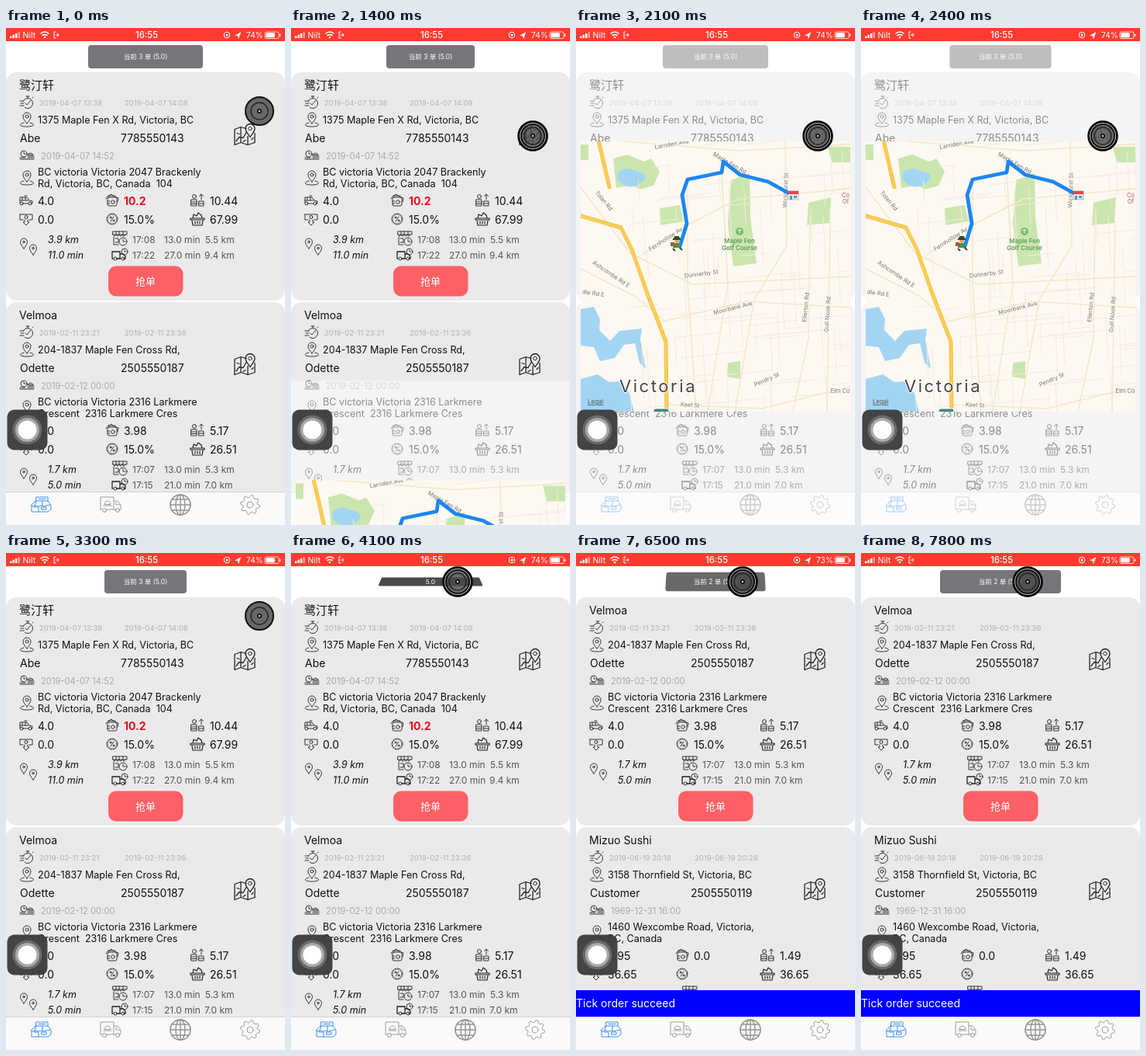
Animation, 360 px wide and 640 px high, one loop 8000 ms. Source, as an HTML page:

```html
<!DOCTYPE html>
<html lang="en">
<head>
<meta charset="utf-8">
<title>Courier orders</title>
<style>
html, body { margin: 0; width: 100%; height: 100%; overflow: hidden; background: #fff; }
svg { display: block; width: 360px; height: 640px; }
text { font-family: Inter, "Noto Sans CJK SC", "Noto Sans CJK", sans-serif; white-space: pre; }
defs g { fill: none; stroke: currentColor; stroke-width: .9; stroke-linecap: round; stroke-linejoin: round; }
.road { font-size: 7.5px; fill: #77736d; text-anchor: middle; stroke: #fdf8f1; stroke-width: 2px; paint-order: stroke; }
</style>
</head>
<body>
<svg id="stage" viewBox="0 0 360 640">
  <defs>
    <g id="watch"><circle cx="1" cy="1" r="6.5" stroke-dasharray="32 9" stroke-dashoffset="-23"/><path d="M-2 1l2 2 5-6M-1-8h4M1-8v2M7-6l1-1M-9-2h5M-8 1h4M-9 4h5"/></g>
    <g id="pin"><path d="M0 5C-3 1-5-1-5-4a5 5 0 0 1 10 0C5-1 3 1 0 5zM-4 4c-8 2-5 5 4 5s12-3 4-5"/><circle cy="-4" r="2"/></g>
    <g id="drop"><path d="M0 6C-3 2-4.5 0-4.5-2.500a4.500 4.500 0 0 1 9 0C4.500 0 3 2 0 6z"/><circle cy="-2.500" r="1.300"/></g>
    <g id="map"><path stroke-width="1.300" d="M2-7l-7-2-8 3v20l8-3 9 3 9-3V-1M-5-9v20M4 3v11M-11 9l4-5 5 1 4-7M-10-1l3 1M-2 10l3-2M9 7l2-2"/><path stroke-width="1.300" d="M7 4C4-1 1-3 1-7a6 6 0 0 1 12 0c0 4-3 6-6 11z"/><circle cx="7" cy="-7" r="2.300"/></g>
    <g id="meal"><circle cx="-4" cy="-2" r="4"/><path d="M-4-4v2h2M-9 5h18M-9 3h7M1-1q4-4 7 0zM1 1h8M1 3h8"/></g>
    <g id="car"><path d="M-8 3v-7h9l3 4 4 1v3h-1M-4 4h7M-5-4v4h8M-1-4v4M-8 0h3M-2-6h3"/><circle cx="-6" cy="4" r="2"/><circle cx="5" cy="4" r="2"/></g>
    <g id="hand"><rect x="-6" y="-4" width="12" height="11" rx="2"/><path d="M-8-2l2-3 5-3 3 3M3-5l5 2-1 5M-6 1h3M-6 4h3M-5-6h9"/><circle cx="1" cy="2" r="2.300"/></g>
    <g id="gain"><path d="M-8-1h7v8h-7zM-8 2h7M-8 4.500h7M2 1h6v6H2zM2 4h6M5-1v-7l-2.500 2.500m2.500-2.500l2.500 2.500"/><circle cx="-4" cy="-5" r="2.500"/></g>
    <g id="note"><path d="M-8-6H8v7H4M-4 1h-4v-7M-2 1v3h-2l4 4 4-4H2V1"/><circle cy="-2.500" r="2"/></g>
    <g id="rate"><circle r="7" stroke-dasharray="2.500 1.200"/><circle r="6" stroke-width=".5"/><path d="M-2 3l4-6"/><circle cx="-2" cy="-2" r="1"/><circle cx="2" cy="2" r="1"/></g>
    <g id="basket"><path stroke-width="1.200" d="M-9-1H9v2H-9zM-7 2l1 6H6l1-6M-3 3v3M0 3v3M3 3v3M-6-1l1-5 4 2 2-4 4 3 1 4"/></g>
    <g id="shop"><path d="M-9-9H9v4H-9zM-9-5q2 4 4 0q2 4 4 0q2 4 4 0q2 4 4 0M-8-2V8h6M-6 0h4v5h-4M-5-9v4M-1-9v4M4-9v4"/><circle cx="4" cy="4" r="5"/><path d="M4 1v3h3"/></g>
    <g id="truck"><path stroke-width="1.300" d="M-10 5v-9H0V5h-4M-9 5h-1M0-1h4l3 3v3H5M0 5h1"/><circle cx="-6" cy="5" r="2"/><circle cx="4" cy="5" r="2"/><circle cx="6" cy="-4" r="4"/><path d="M6-6v2h2"/></g>
    <g id="store"><path d="M-6-9H9v5H-6zM-3-6.500H6M-7-4l-6 6q3 2 6 0q4 2 7 0q4 2 7 0l6-1L9-4M-12 3v7H9l4-3V2M-9 4h6v6M1 4h6v3H1zM-6-4l-2 6M2-4v6"/></g>
    <g id="van"><path d="M-13 7v-16H4V7H-5M-11 7h-2M4-4h5l4 5v6h-2M7 7H4M7-2v3h5M-8 0a4 4 0 0 1 8 0zM-9 2H1"/><circle cx="-8" cy="8" r="2.500"/><circle cx="9" cy="8" r="2.500"/></g>
    <g id="globe"><path stroke-width="1.400" d="M0-13v26M-13 0h26M-11-7h22M-11 7h22"/><circle r="13" stroke-width="1.600"/><ellipse rx="6" ry="13" stroke-width="1.400"/></g>
    <g id="gear"><circle r="4"/><path id="cog"/></g>
    <clipPath id="frame"><rect x="6" y="146" width="348" height="348"/></clipPath>
  </defs>
  <rect width="360" height="640" fill="#fff"/>
  <g id="before"></g>
  <g id="after"></g>
  <g id="pill"><polygon stroke-linejoin="round"/><text text-anchor="middle" fill="#fff" font-size="8.500" y="3"></text></g>
  <g id="toast"><polygon/><text x="0" y="5" font-size="14" fill="#fff">Tick order succeed</text></g>
  <g id="tabs"></g>
  <g id="modal"></g>
  <g id="status"></g>
  <g>
    <rect x="1.500" y="491.500" width="52" height="52" rx="9" fill="#3c3c3f" fill-opacity=".95"/>
    <circle cx="27.500" cy="517.500" r="19" fill="#6a6a6c"/><circle cx="27.500" cy="517.500" r="15.500" fill="#a9a9aa"/><circle cx="27.500" cy="517.500" r="12" fill="#fff"/>
  </g>
  <g id="puck">
    <circle r="18" fill="#48484a" fill-opacity=".8" stroke="#111" stroke-width="2"/>
    <g id="halo" fill="none"><circle r="18.500" stroke="#000" stroke-width="2.500"/><circle r="16.500" stroke="#bbb" stroke-width="1"/><circle r="15" stroke="#000" stroke-width="1.500"/></g>
    <circle r="11" fill="none" stroke="#252527" stroke-width="1.500"/>
    <circle r="3" fill="#111"/><circle r="1.200" fill="#ddd"/>
  </g>
</svg>
<script>
const $ = id => document.getElementById(id);
const text = (x, y, s, size = 14, fill = '#111', more = '') =>
  `<text x="${x}" y="${y}" font-size="${size}" fill="${fill}" ${more}>${s}</text>`;
const icon = (id, x, y, color = '#222') => `<use href="#${id}" x="${x}" y="${y}" color="${color}"/>`;
const path = (d, stroke, width, fill = 'none') =>
  `<path d="${d}" fill="${fill}" stroke="${stroke}" stroke-width="${width}" stroke-linejoin="round" stroke-linecap="round"/>`;

// Order cards
function card(o, y) {
  const small = (x, y, s) => text(x, y, s, 12, '#555');
  const italic = 'font-style="italic"';
  return `<g transform="translate(0 ${y})">
    <rect y="57" width="360" height="294" rx="14" fill="#ebe9eb"/>` +
    text(17, 78.500, o.shop, o.shop.length < 4 ? 15 : 14) +
    icon('watch', 27, 96) + text(43, 99.500, o.from, 9.6, '#b3b1b4') + text(153, 99.500, o.to, 9.6, '#b3b1b4') +
    icon('pin', 27, 118) + text(41, 123, o.pick, 12.6) + icon('map', 308, 136.500) +
    text(18, 147, o.name) + text(148, 147, o.phone) +
    icon('meal', 27, 164) + text(45, 168.500, o.due, 11.2, '#aaa8ab') +
    icon('pin', 27, 193) + text(41, 190, o.drop[0], 12.6) + text(41, 205, o.drop[1], 12.6) +
    ['car', 'hand', 'gain', 'note', 'rate', 'basket'].map((id, i) => {
      const x = [26, 137, 247][i % 3], row = i < 3 ? 222 : 246, hot = o.hot && i == 1;
      return icon(id, x, row) + text([41, 152, 263][i % 3], row + 5.500, o.vals[i], 14,
        hot ? '#f00a16' : '#111', hot ? 'font-weight="700"' : '');
    }).join('') +
    icon('drop', 23, 278) + icon('drop', 35, 286) +
    text(54, 277, o.trip[0], 12.5, '#111', italic) + text(54, 297, o.trip[1], 12.5, '#111', italic) +
    icon('shop', 147, 271) + icon('truck', 147, 292) +
    o.legs.map((leg, i) => leg.map((s, k) => small([163, 204, 257][k] - (k == 2 && i ? 1 : 0), 276.500 + 20 * i, s)).join('')).join('') +
    `<rect x="132" y="306.500" width="96.500" height="39" rx="10" fill="#fd6065"/>` +
    text(180, 330.500, '抢单', 13, '#fff', 'text-anchor="middle"') + '</g>';
}
const orders = [
  { shop: '鹭汀轩', from: '2019-04-07 13:38', to: '2019-04-07 14:08', pick: '1375 Maple Fen X Rd, Victoria, BC',
    name: 'Abe', phone: '7785550143', due: '2019-04-07 14:52', hot: true,
    drop: ['BC victoria Victoria 2047 Brackenly', 'Rd, Victoria, BC, Canada  104'],
    vals: ['4.0', '10.2', '10.44', '0.0', '15.0%', '67.99'], trip: ['3.9 km', '11.0 min'],
    legs: [['17:08', '13.0 min', '5.5 km'], ['17:22', '27.0 min', '9.4 km']] },
  { shop: 'Velmoa', from: '2019-02-11 23:21', to: '2019-02-11 23:36', pick: '204-1837 Maple Fen Cross Rd,',
    name: 'Odette', phone: '2505550187', due: '2019-02-12 00:00',
    drop: ['BC victoria Victoria 2316 Larkmere', 'Crescent  2316 Larkmere Cres'],
    vals: ['4.0', '3.98', '5.17', '0.0', '15.0%', '26.51'], trip: ['1.7 km', '5.0 min'],
    legs: [['17:07', '13.0 min', '5.3 km'], ['17:15', '21.0 min', '7.0 km']] },
  { shop: 'Mizuo Sushi', from: '2019-06-19 20:18', to: '2019-06-19 20:28', pick: '3158 Thornfield St, Victoria, BC',
    name: 'Customer', phone: '2505550119', due: '1969-12-31 16:00',
    drop: ['1460 Wexcombe Road, Victoria,', 'BC, Canada'],
    vals: ['3.95', '0.0', '1.49', '36.65', '', '36.65'], trip: ['', ''], legs: [] }
];
$('before').innerHTML = card(orders[0], 0) + card(orders[1], 296);
$('after').innerHTML = card(orders[1], 0) + card(orders[2], 296);

// Tab bar
let cog = '';
for (let i = 0; i < 32; i++) {
  const a = (i + .5) * Math.PI / 16, r = i % 4 < 2 ? 12.5 : 9.5;
  cog += `${i ? 'L' : 'M'}${r * Math.cos(a)} ${r * Math.sin(a)}`;
}
$('cog').setAttribute('d', cog + 'z');
$('tabs').innerHTML = '<rect y="597.500" width="360" height="43" fill="#faf9fb"/>' + path('M0 597.500H360', '#c4c4c6', .7) +
  icon('store', 45, 613, '#2388f2') + icon('van', 135, 613, '#929294') +
  icon('globe', 225, 614, '#929294') + icon('gear', 315, 614, '#929294');

// Status bar
$('status').innerHTML = '<rect width="360" height="17" fill="#ff3b30"/>' +
  [0, 1, 2, 3].map(i => `<rect x="${5 + 3.5 * i}" y="${10.5 - 1.8 * i}" width="2.500" height="${2.5 + 1.8 * i}" fill="#fff" opacity="${i < 3 ? 1 : .5}"/>`).join('') +
  text(21.500, 12.800, 'Nilt', 10.5, '#fff') +
  path('M45 7q5-4 10 0M47 9.500q3-2 6 0', '#fff', 1.6) + '<circle cx="50" cy="12" r="1.300" fill="#fff"/>' +
  path('M64 5h-2v8h2M64 9h4l-1.500-2m1.500 2l-1.500 2', '#fff', 1) +
  text(181.500, 13, '16:55', 11.4, '#fff', 'text-anchor="middle" font-weight="500"') +
  '<circle cx="285" cy="9" r="3.800" fill="none" stroke="#fff"/><circle cx="285" cy="9" r="1.500" fill="#fff"/>' +
  path('M296 9.500l7-4-3 8-.8-3.500z', '#fff', .5, '#fff') +
  text(310, 12.800, '74%', 10.2, '#fff', 'id="charge"') +
  '<rect x="334" y="5" width="18" height="8.500" rx="2" fill="none" stroke="#fff" stroke-width=".8"/><rect x="335.300" y="6.300" width="11.500" height="6" rx="1" fill="#fff"/><rect x="353" y="7.500" width="1.200" height="3.500" fill="#fff"/>';

// Map sheet
function streets() {
  let seed = 7, thin = '', wide = '';
  const rnd = () => (seed = seed * 16807 % 2147483647) / 2147483647;
  for (let i = 0; i < 110; i++) {
    const x = 70 + rnd() * 285, y = 150 + rnd() * 340, len = 20 + rnd() * 65;
    thin += i % 2 ? `M${x} ${y}l${len} ${-len * .1}` : `M${x} ${y}l${len * .05} ${len}`;
  }
  for (const d of ['M6 205L70 290 150 330 354 320', 'M85 292L135 258 210 220 354 207', 'M112 378L220 352 354 360',
    'M60 146L210 158 354 150', 'M270 146L272 280 230 350 205 494', 'M302 240L300 400 280 494', 'M328 250L324 494',
    'M118 485L240 490 354 462', 'M6 310L75 345 112 375', 'M188 186L196 330 170 494', 'M144 195L144 330 155 494']) wide += d;
  return path(thin, '#f4ebdf', 1) + path(wide, '#f5e6c8', 1.5);
}
const road = (x, y, angle, s) => `<text class="road" transform="translate(${x} ${y}) rotate(${angle})">${s}</text>`;
const park = d => path(d, 'none', 0, '#cae6ae'), water = d => path(d, 'none', 0, '#a3d5f3');
const highway = 'M28 140L43 205M6 242L58 257 72 285 92 342 116 404 117 494';
$('modal').innerHTML = '<rect y="18" width="360" height="640" fill="#fff" fill-opacity=".52"/><g clip-path="url(#frame)">' +
  '<rect x="6" y="146" width="348" height="348" fill="#fdf8f1"/>' +
  park('M48 168L66 163 88 172 97 168 108 185 100 203 82 208 73 202 52 206z M108 232l26-4 5 21-30 5z M200 196l24-9 1 58 8 58-30 4-7-55z M300 225l29-7-2 33-29 3z M196 431l16-2v23l-17-3z M325 153h29v20h-24z M6 150h10v20H6z') +
  water('M53 188q7-9 18-6l14 4q9 6 0 13-12 9-24 3l-7-6z M6 362l17-3 8 16-1 14 14 14 12-13 29-3-2 14 7 38-8-8-6-25-14 2-12 17-19 4-8-18-17-2z M6 452l22-6 15 10 16-1 10 16 6 23H6z') +
  streets() + path(highway, '#eabb48', 5) + path(highway, '#fccd52', 3.800) +
  road(124, 152, -10, 'Larriden Ave') + road(197, 176, 30, 'Maple Fen Rd') + road(34, 224, 50, 'Tolan Rd') +
  road(117, 274, -33, 'Fernhollow Av') + road(162, 319, -7, 'Dunnerby St') + road(203, 363, -14, 'Moorbank Ave') +
  road(273, 209, -88, 'Wickhurst St') + road(299, 360, -84, 'Ellerton Rd') + road(327, 369, -86, 'Gull Nook Rd') +
  road(247, 455, -24, 'Pendry St') + road(44, 319, 34, 'Ashcombe Rd E') + road(22, 344, 8, 'dle Rd E') +
  road(147, 488, 4, 'Keel St') + road(341, 470, 0, 'Elm Co') +
  text(348, 218, 'Co', 7.5, '#c15d5d', 'text-anchor="middle"') + text(348, 226, 'Of', 7.5, '#c15d5d', 'text-anchor="middle"') +
  '<circle cx="211" cy="262" r="5" fill="#7dba6c"/>' + path('M211 264v-4m-2 1l2-2 2 2', '#fff', 1) +
  text(211, 277, 'Maple Fen', 8, '#5a9a55', 'text-anchor="middle" font-weight="600"') +
  text(211, 286, 'Golf Course', 8, '#5a9a55', 'text-anchor="middle" font-weight="600"') +
  text(106, 469, 'Victoria', 22, '#444', 'text-anchor="middle" letter-spacing="2.600" stroke="#fff" stroke-width="2" paint-order="stroke"') +
  text(15, 484, 'Legal', 8, '#555', 'text-decoration="underline"') +
  '<rect x="100" y="490" width="20" height="9" rx="3" fill="#378a78" stroke="#fff"/>' +
  path('M134 281L143 252 137 215 144 195 188 186 190 172 212 189 248 198 275 213', '#1d86f0', 4.800) +
  '<rect x="274" y="210" width="13" height="11" fill="#eee" stroke="#777" stroke-width=".5"/><path d="M274 210h13v4h-13z" fill="#e34548"/><path d="M276 216h3v5h-3zM281 216h4v3h-4z" fill="#588ebd"/>' +
  '<circle cx="130" cy="274" r="3" fill="#e1ac66"/><path d="M126 272h8l-2-3h-4zM125 284l3 3M133 282l4 4" fill="#354a28" stroke="#354a28" stroke-width="2"/><path d="M125 277h9v6h-9z" fill="#558d48"/><path d="M122 276h5v5h-5z" fill="#a95836"/></g>';

// Motion
const clamp = v => Math.max(0, Math.min(1, v));
const span = (t, start, length = 500) => clamp((t - start) / length);
const smooth = p => p * p * (3 - 2 * p);
function track(t, keys) {
  let i = 1;
  while (i < keys.length - 1 && t > keys[i][0]) i++;
  const [a, ...from] = keys[i - 1], [b, ...to] = keys[i], p = smooth(span(t, a, b - a));
  return from.map((v, k) => v + (to[k] - v) * p);
}
const pillWidth = [[0, 148], [100, 148], [500, 112], [1300, 112], [1400, 114], [2100, 136], [3300, 106], [4100, 134],
  [4900, 104], [5600, 104], [6600, 130], [7100, 130], [7800, 156]];
const puckPath = [[0, 327, 107], [100, 327, 107], [500, 312, 139], [2900, 312, 139], [3250, 327, 81], [3350, 327, 81], [3800, 215, 37]];
const flips = [3790, 4500, 5250, 6100];
const gray = [119, 117, 121], red = [200, 0, 0];
const faces = [['当前 3 单 (5.0)', gray], ['5.0', gray], ['当前 3 单 (5.0)', gray], ['当前 3 单 (5.0)', red], ['当前 2 单 (5.0)', gray]];

function drawPill(t) {
  const w = track(t, pillWidth)[0] / 2;
  const tilt = flips.reduce((m, s) => Math.min(m, Math.abs(Math.cos(Math.PI * span(t, s)))), 1);
  const [label, rgb] = faces[flips.filter(s => t >= s + 250).length];
  const r = 4 * tilt, h = 15 * tilt - r, lean = 6 * (1 - tilt);
  const [shape, words] = $('pill').children;
  const color = `rgb(${rgb.map(c => c * (.4 + .6 * tilt))})`;
  $('pill').setAttribute('transform', 'translate(180 37)');
  shape.setAttribute('points', `${r + lean - w},${-h} ${w - r - lean},${-h} ${w - r},${h} ${r - w},${h}`);
  shape.setAttribute('fill', color);
  shape.setAttribute('stroke', color);
  shape.setAttribute('stroke-width', 2 * r);
  words.textContent = label;
  words.setAttribute('transform', `scale(1 ${Math.min(1, 2.5 * tilt)})`);
}
function drawToast(t) {
  const open = Math.sin(Math.PI / 2 * span(t, 5295)), h = 17 * open, lean = 8 * (1 - open);
  const [shape, words] = $('toast').children;
  $('toast').setAttribute('transform', 'translate(0 580)');
  shape.setAttribute('points', `${lean},${-h} ${360 - lean},${-h} 360,${h} 0,${h}`);
  shape.setAttribute('fill', `rgb(0 0 ${255 * open * open})`);
  words.setAttribute('transform', `translate(${lean} 0) scale(1 ${open})`);
  $('toast').style.display = open ? '' : 'none';
}
function draw(now) {
  const t = now % 8000;
  const rise = smooth(span(t, 1220)) - smooth(span(t, 2550));
  const [x, y] = track(t, puckPath);
  const pressed = t >= 1250 && t < 2900 || t >= 3800;
  $('before').style.display = t < 6050 ? '' : 'none';
  $('after').style.display = t < 6050 ? 'none' : '';
  $('modal').setAttribute('transform', `translate(0 ${622 * (1 - rise)})`);
  $('modal').style.display = rise ? '' : 'none';
  $('charge').textContent = t < 5300 ? '74%' : '73%';
  $('puck').setAttribute('transform', `translate(${x} ${y})`);
  $('halo').style.display = pressed ? '' : 'none';
  drawPill(t);
  drawToast(t);
  requestAnimationFrame(() => draw(performance.now() - begin));
}
const begin = performance.now();
draw(0);
</script>
</body>
</html>
```
